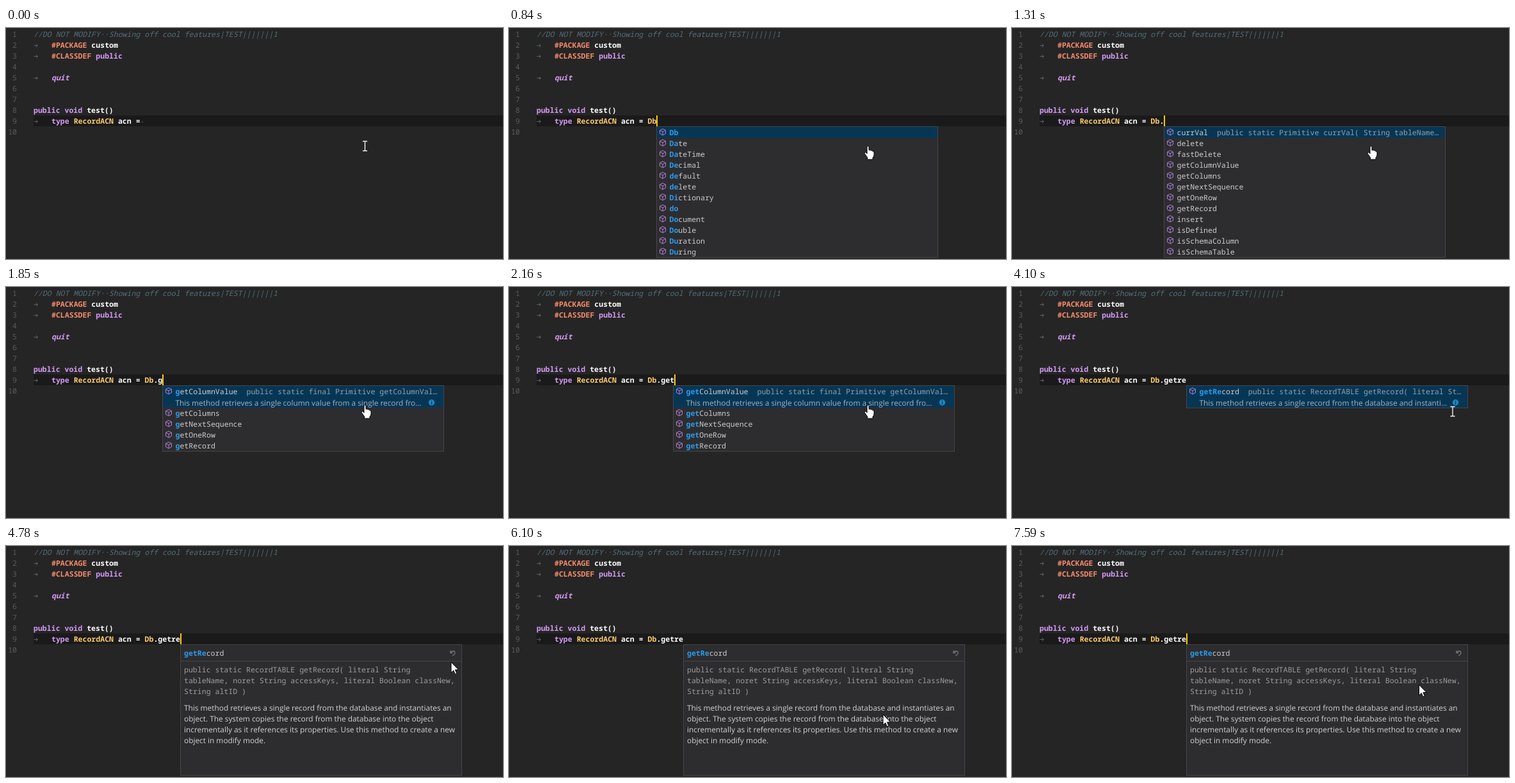
These frames come from a looping animation (776x362 px, 8000 ms). An HTML page:

```html
<!DOCTYPE html>
<html lang="en">
<head>
<meta charset="utf-8">
<title>Code completion</title>
<style>
  html, body { margin: 0; width: 100%; height: 100%; overflow: hidden; background: #252525; }
  svg { display: block; width: 776px; height: 362px; }
  text { white-space: pre; text-rendering: geometricPrecision; font: 500 11.55px "Noto Sans Mono", monospace; fill: #ccc; }
  .code text { font-weight: 600; fill: #fff; }
  .code .num { font-weight: 400; fill: #5a5a5a; text-anchor: end; }
  .code .comment { font-weight: 400; font-style: italic; fill: #546e7a; }
  .code .quit { font-style: italic; }
  .key, .code text.key { fill: #d59af6; }
  .dir { fill: #f78c6c; }
  .type { fill: #ffcb6b; }
  .tab { fill: none; stroke: #5a646b; }
  .hit { fill: #2b9bea; font-weight: 700; }
  .sig { fill: #8fa1ae; }
  .muted { fill: #9c9c9c; }
  text.prose { font: 11.87px "Open Sans", sans-serif; fill: #d2d2d2; }
  text.pale { fill: #a3b3be; }
  .box { fill: #2d2d30; stroke: #454545; }
  .cube { fill: none; stroke: #b180d7; }
  .pointer { fill: #fff; stroke: #000; }
</style>
</head>
<body>
<svg viewBox="0 0 776 362">
  <rect width="776" height="362" fill="#252525"/>
  <rect x="43" y="137" width="733" height="17" fill="#1a1a1a"/>
  <g class="code">
    <g id="gutter"></g>
    <text class="comment" x="43" y="14">//DO NOT MODIFY··Showing off cool features|TEST|||||||1</text>
    <text x="71" y="31"><tspan class="dir">#PACKAGE</tspan> custom</text>
    <text x="71" y="48"><tspan class="dir">#CLASSDEF</tspan> <tspan class="key">public</tspan></text>
    <text x="71" y="82" class="key quit">quit</text>
    <text x="43" y="133"><tspan class="key">public void</tspan> test()</text>
    <text x="71" y="150"><tspan class="key">type</tspan> <tspan class="type">RecordACN</tspan> acn = <tspan class="type" id="owner"></tspan><tspan id="member"></tspan></text>
    <circle id="space" cx="213" cy="147" r=".8" fill="#777"/>
  </g>
  <g id="popup"></g>
  <rect id="caret" y="137" width="2" height="17" fill="#ffcc00"/>
  <g id="mouse">
    <path id="beam" d="M-3.5 -7.5H-1L0 -7L1 -7.5H3.5M0 -7V7M-3.5 7.5H-1L0 7L1 7.5H3.5" fill="none" stroke="#fff" stroke-width="1.3"/>
    <path id="hand" class="pointer" d="M-1.5 1Q0 -1 1.5 1V6.5Q3 5.5 4.2 7Q5.8 6.2 7 8Q9.5 7.5 9.5 10V14Q9 17 7.5 18V21H-1V18L-5.5 11.5Q-5.5 9 -3 10L-1.5 12Z"/>
    <path id="arrow" class="pointer" d="M0 0V16.5L3.8 13L6.3 18.8L8.8 17.7L6.4 12H11.6Z"/>
  </g>
</svg>
<script>
const LOOP = 8000, CHAR = 6.93, ROW = 17, TOP = 154, WIDTH = 440;
const $ = id => document.getElementById(id);

const words = ["Db", "Date", "DateTime", "Decimal", "default", "delete", "Dictionary", "do", "Document", "Double", "Duration", "During"];
const getters = ["getColumnValue", "getColumns", "getNextSequence", "getOneRow", "getRecord"];
const methods = ["currVal", "delete", "fastDelete", ...getters, "insert", "isDefined", "isSchemaColumn", "isSchemaTable"];
const record = ["getRecord"];

const details = {
  currVal: ["public static Primitive currVal( String tableName…",
    "This method retrieves the current value of the sequence for a table…"],
  getColumnValue: ["public static final Primitive getColumnVal…",
    "This method retrieves a single column value from a single record fro…"],
  getRecord: ["public static RecordTABLE getRecord( literal St…",
    "This method retrieves a single record from the database and instanti…"]
};
const signature = [
  "public static RecordTABLE getRecord( literal String",
  "tableName, noret String accessKeys, literal Boolean classNew,",
  "String altID )"];
const help = [
  "This method retrieves a single record from the database and instantiates an",
  "object. The system copies the record from the database into the object",
  "incrementally as it references its properties. Use this method to create a new",
  "object in modify mode."];

const scenes = [
  { at: 0, typed: "" },
  { at: 530, typed: "D" },
  { at: 610, typed: "D", items: words },
  { at: 840, typed: "Db", items: words },
  { at: 930, typed: "Db", items: ["Db"] },
  { at: 1310, typed: "Db.", items: methods },
  { at: 1410, typed: "Db.", items: methods, summary: true },
  { at: 1850, typed: "Db.g", items: getters, summary: true },
  { at: 2030, typed: "Db.ge", items: getters, summary: true },
  { at: 2100, typed: "Db.get", items: getters, summary: true, lag: 7 },
  { at: 2160, typed: "Db.get", items: getters, summary: true, lag: 2 },
  { at: 2260, typed: "Db.get", items: getters, summary: true },
  { at: 2560, typed: "Db.getr", items: record, summary: true },
  { at: 2640, typed: "Db.getre", items: record },
  { at: 2720, typed: "Db.getre", items: record, summary: true },
  { at: 4700, typed: "Db.getre", panel: true }
];

const blinks = [380, 3080, 3590, 4080, 4630, 5110, 5600, 6100, 6610, 7120, 7590];

const legs = [
  { from: 3550, to: 3670, steps: 2, path: [[560.5, 185], [632, 219]] },
  { from: 3860, to: 4400, steps: 8, path: [[632, 219], [672, 204], [704, 186], [695, 182]] },
  { from: 5340, to: 6100, steps: 11, path: [[695, 182], [655, 225], [625, 280], [600, 306], [584, 264]] },
  { from: 6170, to: 6950, steps: 11, path: [[584, 264], [592, 292], [618, 270], [630, 235], [635.5, 217.5]] }
];

const text = (x, y, body, cls = "") => `<text x="${x}" y="${y}" class="${cls}">${body}</text>`;
const box = (x, height) =>
  `<rect class="box" x="${x + .5}" y="${TOP + .5}" width="${WIDTH - 1}" height="${height - 1}"/>`;
const marked = (name, n) => `<tspan class="hit">${name.slice(0, n)}</tspan>${name.slice(n)}`;
const cube = (x, y) =>
  `<path class="cube" d="M${x} ${y - 5}l4.5 2.3v5.2l-4.5 2.5l-4.5 -2.5v-5.2zm-4.5 2.3l4.5 2.3l4.5 -2.3m-4.5 2.3v5.4"/>`;

function drawList(x, { items, summary, typed }) {
  const hits = typed.includes(".") ? typed.length - 3 : typed.length;
  const extra = summary ? 1 : 0;
  let out = box(x, (items.length + extra) * ROW + 2) +
    `<rect x="${x + 1}" y="${TOP + 1}" width="${WIDTH - 2}" height="${ROW * (1 + extra)}" fill="#073655"/>`;
  items.forEach((name, i) => {
    const y = TOP + 14 + ROW * (i ? i + extra : 0);
    out += cube(x + 10, y - 5) + text(x + 20.5, y, marked(name, hits));
  });
  const detail = details[items[0]];
  if (detail) out += text(x + 34.5 + items[0].length * CHAR, TOP + 14, detail[0], "sig");
  if (detail && summary) {
    out += text(x + 20.5, TOP + 31.5, detail[1], "prose pale") +
      `<circle cx="${x + 420.5}" cy="181" r="4.7" fill="#1b87c4"/>` +
      `<path d="M${x + 420.5} 178v1.3m0 1v3.7" stroke="#073655" stroke-width="1.3"/>`;
  }
  return out;
}

function drawPanel(x) {
  return box(x, 206) + `<path d="M${x + 1} 180.5h438" stroke="#454545"/>` +
    text(x + 6, 172, marked("getRecord", 5)) +
    `<path d="M${x + 422} 164v3.5h3.5m-3.5 0c2 -4 7.5 -3.5 7 .5c-.2 2 -2 3 -4 4" fill="none" stroke="#777" stroke-width="1.3"/>` +
    signature.map((line, i) => text(x + 6, 198 + ROW * i, line, "muted")).join("") +
    help.map((line, i) => text(x + 6, 257.5 + ROW * i, line, "prose")).join("");
}

function showScene(scene) {
  const { typed } = scene;
  const caretX = Math.round(71 + CHAR * (21 + typed.length));
  $("owner").textContent = typed.slice(0, 2);
  $("member").textContent = typed.slice(2);
  $("space").style.display = typed ? "none" : "";
  $("caret").setAttribute("x", caretX);
  const x = caretX - (scene.lag || 0);
  $("popup").innerHTML = scene.panel ? drawPanel(x) : scene.items ? drawList(x, scene) : "";
}

function along(path, p) {
  const s = p * (path.length - 1), i = Math.min(Math.floor(s), path.length - 2);
  return path[i].map((v, k) => v + (path[i + 1][k] - v) * (s - i));
}

function mouseAt(t) {
  const leg = legs.findLast(l => t >= l.from);
  if (!leg) return legs[0].path[0];
  const step = Math.floor((t - leg.from) / (leg.to - leg.from) * (leg.steps - 1)) + 1;
  return along(leg.path, Math.min(step / leg.steps, 1));
}

for (let n = 1; n <= 10; n++) {
  const y = 14 + ROW * (n - 1);
  $("gutter").innerHTML += text(17, y, n, "num") +
    ([2, 3, 5, 9].includes(n) ? `<path class="tab" d="M43.5 ${y - 3.5}h6m-2.5 -2.5l2.5 2.5l-2.5 2.5"/>` : "");
}

let shown;
function frame() {
  const t = performance.now() % LOOP;
  const scene = scenes.findLast(s => t >= s.at);
  if (scene !== shown) showScene(shown = scene);
  $("caret").style.display = blinks.filter(b => t >= b).length % 2 ? "" : "none";

  const [x, y] = mouseAt(t);
  const kind = t >= 4780 ? "arrow" : t >= 610 && y < 190 ? "hand" : "beam";
  $("mouse").setAttribute("transform", `translate(${x} ${y})`);
  for (const id of ["beam", "hand", "arrow"]) $(id).style.display = id === kind ? "" : "none";
  requestAnimationFrame(frame);
}
frame();
</script>
</body>
</html>
```
